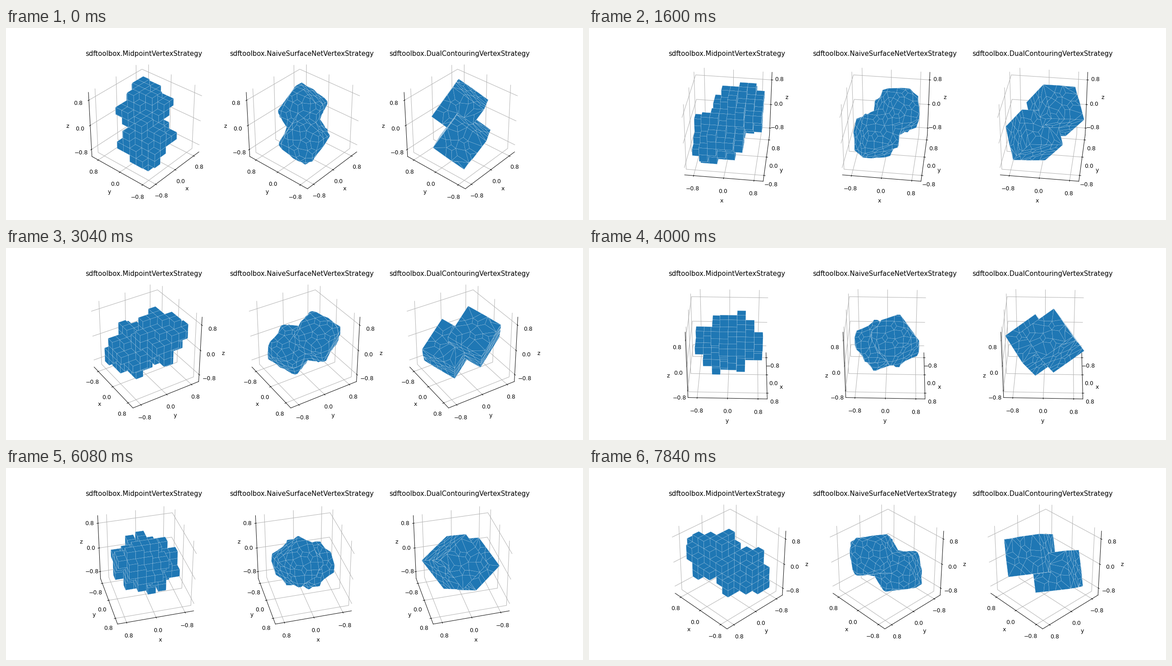
These frames come from a looping animation (1280 by 427 pixels, 8 s). A matplotlib script:

```python
import itertools

import matplotlib.pyplot as plt
import numpy as np
from matplotlib.animation import FuncAnimation
from mpl_toolkits.mplot3d.art3d import Poly3DCollection

FRAMES, INTERVAL = 50, 160
ELEV, AZIM, TURN = 35, -139, 360 / 64
DPI = 1280 / 14.4
N = 10                      # samples per grid axis on [-1, 1]
STEP = 2 / (N - 1)
CENTERS = [np.full(3, 0.25), np.full(3, -0.25)]


def rotation(axis, angle):
    """Rotation matrix about an axis (Rodrigues)."""
    x, y, z = np.array(axis) / np.linalg.norm(axis)
    k = np.array([[0, -z, y], [z, 0, -x], [-y, x, 0]])
    return np.eye(3) + np.sin(angle) * k + (1 - np.cos(angle)) * k @ k


ROT = rotation((1, 1, 1), np.pi / 4)


def box(p, center):
    """Signed distance to a rotated unit cube."""
    a = np.abs((p - center) @ ROT) - 0.5
    return np.linalg.norm(np.maximum(a, 0), axis=-1) + np.minimum(a.max(-1), 0)


def field(p):
    return np.minimum(*[box(p, c) for c in CENTERS])


def normal(p):
    """Normal of the cube face closest to p."""
    local = min(((p - c) @ ROT for c in CENTERS), key=lambda q: np.abs(q).max())
    k = np.abs(local).argmax()
    return ROT[:, k] * np.sign(local[k])


def crossing(a, b, steps=10):
    """Surface point on the edge a-b: linear guess, then clipped Newton."""
    da, db = field(a), field(b)
    t = da / (da - db)
    for _ in range(steps):
        p = a + t * (b - a)
        t = np.clip(t - field(p) / (normal(p) @ (b - a)), 0, 1)
    return a + t * (b - a)


def dual_grid():
    """Surface crossings of each active cell, and quads of cell indices."""
    line = np.linspace(-1, 1, N)
    pts = np.stack(np.meshgrid(line, line, line, indexing="ij"), -1)
    inside = field(pts) < 0
    unit = np.eye(3, dtype=int)
    cells, quads = {}, []
    for axis in range(3):
        u, v = unit[(axis + 1) % 3], unit[(axis + 2) % 3]
        for i in itertools.product(range(N), repeat=3):
            if i[axis] == N - 1:
                continue
            j = tuple(i + unit[axis])
            if inside[i] == inside[j]:
                continue
            hit = crossing(pts[i], pts[j])
            ring = [tuple(int(n) for n in i - a * u - b * v)
                    for a, b in ((0, 0), (1, 0), (1, 1), (0, 1))]
            quads.append(ring)
            for cell in ring:
                cells.setdefault(cell, []).append(hit)
    return cells, quads


def midpoint(cell, hits):
    return -1 + (np.array(cell) + 0.5) * STEP


def surface_net(cell, hits):
    return np.mean(hits, axis=0)


def dual_contour(cell, hits, bias=0.01):
    mean = np.mean(hits, axis=0)
    a = np.array([normal(h) for h in hits])
    b = np.sum(a * (np.array(hits) - mean), axis=1)
    return mean + np.linalg.solve(a.T @ a + bias * np.eye(3), a.T @ b)


def setup_axes(ax, title):
    lim = 25 / 24
    ax.set(xlim=(-lim, lim), ylim=(-lim, lim), zlim=(-lim, lim),
           xlabel="x", ylabel="y", zlabel="z")
    ax.set_box_aspect((1, 1, 1))
    for axis in (ax.xaxis, ax.yaxis, ax.zaxis):
        axis.set_ticks([-0.8, 0, 0.8])
        axis.set_pane_color((1, 1, 1, 1))
    ax.set_title(title)


STRATEGIES = {
    "sdftoolbox.MidpointVertexStrategy": midpoint,
    "sdftoolbox.NaiveSurfaceNetVertexStrategy": surface_net,
    "sdftoolbox.DualContouringVertexStrategy": dual_contour,
}

# the tiny excess keeps the pixel size from truncating
fig = plt.figure(figsize=(1280.001 / DPI, 427.001 / DPI), dpi=DPI)
cells, quads = dual_grid()
axes = []
for n, (title, place) in enumerate(STRATEGIES.items(), 1):
    ax = fig.add_subplot(1, 3, n, projection="3d")
    setup_axes(ax, title)
    verts = {cell: place(cell, hits) for cell, hits in cells.items()}
    faces = np.array([[verts[c] for c in ring] for ring in quads])
    ax.add_collection3d(Poly3DCollection(
        faces, facecolor="#1f77b4", edgecolor="w", linewidth=0.2, zorder=1))
    axes.append(ax)


def update(i):
    for ax in axes:
        ax.view_init(elev=ELEV, azim=AZIM + TURN * i)
    return axes


anim = FuncAnimation(fig, update, frames=FRAMES, interval=INTERVAL,
                     init_func=lambda: update(0), repeat=True, repeat_delay=0)
plt.show()
```
